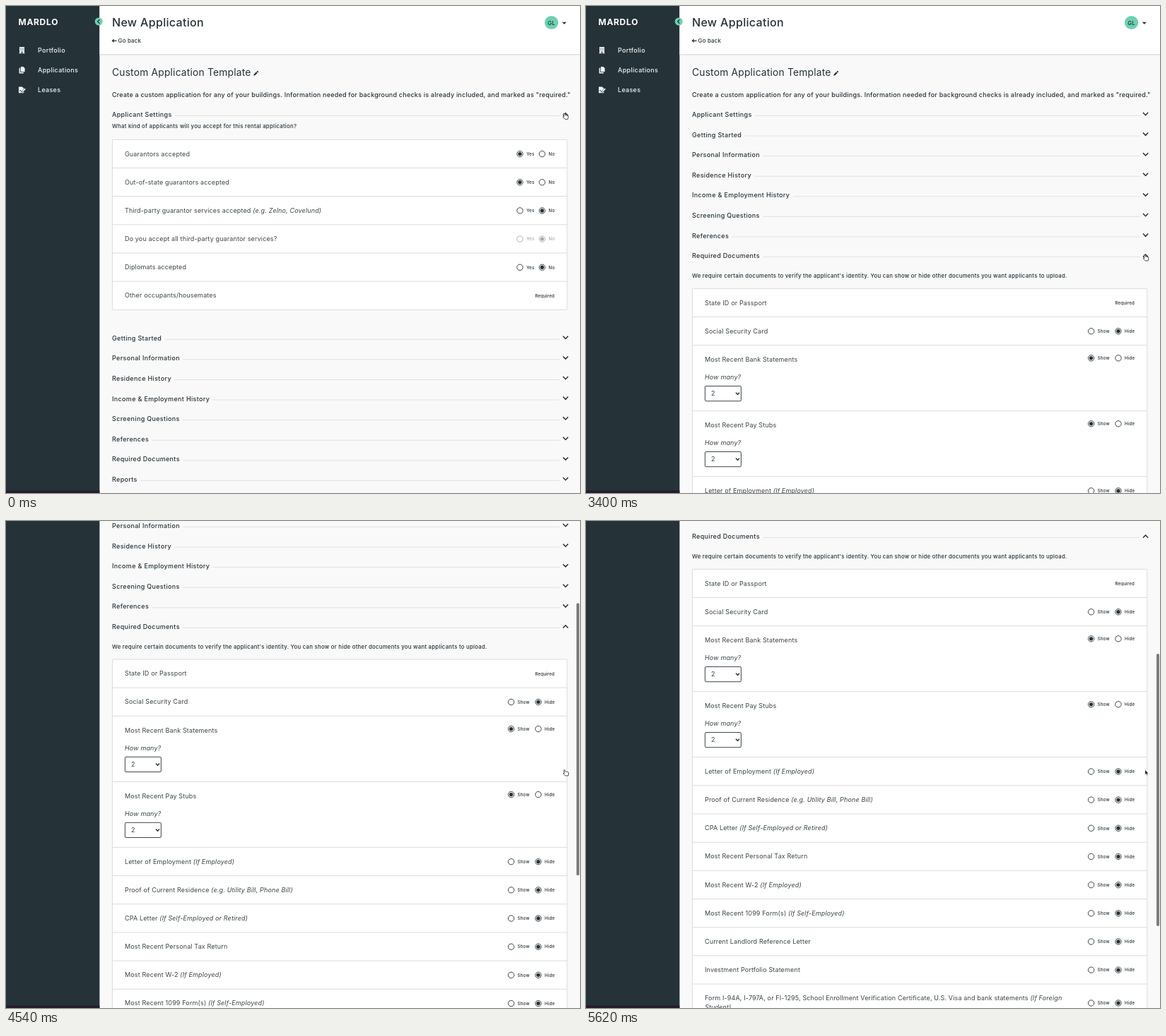
An HTML page for the animation above (5.64 s loop, 812 by 690 pixels).

```html
<!DOCTYPE html>
<html lang="en">
<head>
<meta charset="utf-8">
<title>New Application</title>
<style>
  html, body { margin: 0; width: 100%; height: 100%; overflow: hidden; background: #f9f9f9; }
  svg { display: block; width: 812px; height: 690px; }
  text { font-family: Inter, "Open Sans", sans-serif; fill: #263238; white-space: pre; }
  .h1 { font-size: 16px; font-weight: 450; letter-spacing: .32px; }
  .h2 { font-size: 13.8px; letter-spacing: .2px; }
  .lead { font-size: 9px; font-weight: 450; letter-spacing: .21px; }
  .title { font-size: 9px; font-weight: 450; letter-spacing: .33px; }
  .note { font-size: 7.8px; font-weight: 450; letter-spacing: .25px; }
  .row { font-size: 9px; letter-spacing: .14px; fill: #3a4549; }
  .tiny { font-size: 6.2px; font-weight: 450; letter-spacing: .15px; }
  .nav { font-size: 9px; font-weight: 450; letter-spacing: .3px; fill: #f1f4f4; }
  .brand { font-size: 12px; font-weight: 700; letter-spacing: .7px; fill: #fff; }
  .i { font-style: italic; }
</style>
</head>
<body>
<svg id="stage" viewBox="0 0 812 690" xmlns="http://www.w3.org/2000/svg"></svg>
<script>
const NS = "http://www.w3.org/2000/svg";
const INK = "#263238", LINE = "#dadcdd", GREEN = "#6bd0b1";
const LOOP = 5640, PITCH = 28.6, ROW = 40.17, SIDE = 132.4;
const FONT_SIZE = { h1: 16, h2: 13.8, lead: 9, title: 9, note: 7.8, row: 9, tiny: 6.2, nav: 9, brand: 12 };
const stage = document.getElementById("stage");

function add(parent, tag, attrs = {}) {
  const node = document.createElementNS(NS, tag);
  for (const key in attrs) node.setAttribute(key, attrs[key]);
  return parent.appendChild(node);
}
const rect = (parent, x, y, width, height, fill, more) =>
  add(parent, "rect", { x, y, width, height, fill, ...more });
const path = (parent, d, more) => add(parent, "path", { d, ...more });
const stroke = (color, width) => ({ fill: "none", stroke: color, "stroke-width": width });

// y is the visual middle of the capitals
function text(parent, kind, x, y, content, more) {
  const node = add(parent, "text", { class: kind, x, y: y + FONT_SIZE[kind] * .36, ...more });
  node.textContent = content;
  return node;
}

// A trailing parenthesis is set in italics
function label(parent, x, y, content) {
  const [, main, aside] = content.match(/^(.*?)( \(.*)?$/);
  const node = text(parent, "row", x, y, main);
  if (aside) add(node, "tspan", { class: "i" }).textContent = aside;
}

function radio(parent, x, y, name, on, gap) {
  add(parent, "circle", { cx: x, cy: y, r: 4.2, fill: "#fff", stroke: INK, "stroke-width": .9 });
  if (on) add(parent, "circle", { cx: x, cy: y, r: 2.7, fill: INK });
  text(parent, "tiny", x + gap, y, name);
}

function choice(parent, y, type) {
  if (type === "required" || type === "optional") {
    const name = type[0].toUpperCase() + type.slice(1);
    text(parent, "tiny", 776, y, name, { "text-anchor": "end" });
    return;
  }
  const group = add(parent, "g", type === "locked" ? { opacity: .42 } : {});
  if (["yes", "no", "locked"].includes(type)) {
    radio(group, 727, y, "Yes", type === "yes", 9.2);
    radio(group, 758.4, y, "No", type !== "yes", 9.2);
  } else {
    const shown = type === "show" || type === "count";
    radio(group, 714.6, y, "Show", shown, 9);
    radio(group, 753, y, "Hide", !shown, 9);
  }
}

function select(parent, y) {
  text(parent, "row", 168, y + 45.3, "How many?", { class: "row i" });
  rect(parent, 168.4, y + 57.9, 51, 21.2, "#fff", { rx: 1.5, stroke: INK, "stroke-width": .9 });
  text(parent, "row", 177, y + 68.6, "2");
  path(parent, `M212 ${y + 67.2}l2.5 2.6 2.5-2.6`, stroke(INK, 1.5));
}

function card(parent, top, rows) {
  const heights = { count: 93, double: 53 };
  const height = type => heights[type] || ROW;
  const total = rows.reduce((sum, [, type]) => sum + height(type), 0);
  rect(parent, 150.4, top, 643.4, total, "#fff", { stroke: LINE, rx: 1 });
  let y = top;
  rows.forEach(([name, type], index) => {
    if (index) path(parent, `M150 ${y}H794`, stroke(LINE, 1));
    label(parent, 168, y + 20, name);
    if (type === "count") select(parent, y);
    if (type === "double") text(parent, "row", 168, y + 33, "Student)", { class: "row i" });
    choice(parent, y + (type === "count" ? 18.2 : type === "double" ? 27 : 20.3), type);
    y += height(type);
  });
}

const sections = ["Applicant Settings", "Getting Started", "Personal Information", "Residence History",
  "Income & Employment History", "Screening Questions", "References", "Required Documents", "Reports"];

function heading(parent, y, name, open) {
  const node = text(parent, "title", 150, y, name);
  const end = 154.5 + node.getComputedTextLength();
  path(parent, `M${end} ${y + 1.6}H783.5`, stroke("#dddfe0", .9));
  const d = open ? `M788 ${y + 1.8}l3.6-3.7 3.6 3.7` : `M788 ${y - 2.8}l3.6 3.7 3.6-3.7`;
  path(parent, d, stroke(INK, 1.5));
}

function view(parent, { open, note, noteGap, cardGap, after, rows }) {
  const group = add(parent, "g");
  sections.forEach((name, index) => {
    const y = 153.8 + index * PITCH + (index > open ? after : 0);
    heading(group, y, name, index === open);
    if (index !== open) return;
    text(group, "note", 150, y + noteGap, note);
    card(group, y + cardGap, rows);
  });
  return group;
}

function chrome(parent) {
  rect(parent, SIDE, -2, 812 - SIDE, 70.5, "#fff");
  path(parent, `M${SIDE} 68.8H812`, stroke("#d9dbdc", 1.2));
  text(parent, "h1", 150, 22.8, "New Application");
  path(parent, "M150.5 49.3H156.5M152.6 47.2L150.5 49.3l2.1 2.1", stroke(INK, 1.3));
  text(parent, "note", 158.6, 49.3, "Go back");
  add(parent, "circle", { cx: 771.6, cy: 23.5, r: 9.6, fill: GREEN });
  text(parent, "note", 771.6, 23.7, "GL", { "text-anchor": "middle" });
  path(parent, "M786.8 22.8h6l-3 3.2z", { fill: INK });

  text(parent, "h2", 150, 94, "Custom Application Template");
  path(parent, "M350.2 98.8l.5-2.1 3.4-3.4 1.6 1.6-3.4 3.4zM354.6 92.8l.7-.7q.5-.4 1 0l.6.6q.4.5 0 1l-.7.7z", { fill: INK });
  text(parent, "lead", 150, 125.3, "Create a custom application for any of your buildings. Information needed for background checks is already included, and marked as \"required.\"");
}

function sidebar(parent) {
  text(parent, "brand", 17.5, 22.4, "MARDLO");
  ["Portfolio", "Applications", "Leases"].forEach((name, index) => text(parent, "nav", 45, 62.4 + index * 28.1, name));
  const icon = { fill: "#f1f4f4" };
  path(parent, "M19 58h7v8.5h.6v.8h-8.2v-.8H19z", icon);
  path(parent, "M21 59.6v4M24 59.6v4", { ...stroke("#253338", 1.1), "stroke-dasharray": "1 .7" });
  rect(parent, 21.8, 64.5, 1.5, 2.8, "#253338");
  path(parent, "M21 86h3.4l2.2 2.2v5H21z", icon);
  path(parent, "M18.6 87.8h1.6v6.2h4.6v1.4h-6.2z", icon);
  path(parent, "M18 114.4h5l2 2v1.2l-3.6 3.6v1h3l.9-.9v1.9H18z", icon);
  path(parent, "M22.5 121.9l.3-1.6 3.7-3.7 1.3 1.3-3.7 3.7z", icon);
  path(parent, "M19.4 120.8l1-1.8.9 1.6", stroke("#253338", .8));
  add(parent, "circle", { cx: 131.2, cy: 22, r: 5.5, fill: GREEN });
  path(parent, "M132.4 19.3l-2.7 2.7 2.7 2.7", stroke(INK, 1.3));
}

rect(stage, 0, 0, 812, 690, "#f9f9f9");
rect(stage, 0, 0, SIDE, 690, "#253338");
const page = add(stage, "g");
chrome(page);
sidebar(page);

const views = [
  view(page, {
    open: 0, noteGap: 16.8, cardGap: 35.5, after: 288.2,
    note: "What kind of applicants will you accept for this rental application?",
    rows: [
      ["Guarantors accepted", "yes"],
      ["Out-of-state guarantors accepted", "yes"],
      ["Third-party guarantor services accepted (e.g. Zelno, Covelund)", "no"],
      ["Do you accept all third-party guarantor services?", "locked"],
      ["Diplomats accepted", "no"],
      ["Other occupants/housemates", "required"]
    ]
  }),
  view(page, {
    open: 2, noteGap: 28, cardGap: 46.3, after: 900,
    note: "We require certain questions to verify the applicant's identity. You can add or remove optional questions for your custom application.",
    rows: [
      ["First Name", "required"],
      ["Middle Name", "optional"],
      ["Last Name", "required"],
      ["Date of Birth", "required"],
      ["Phone Number", "required"],
      ["Email Address", "required"],
      ["Social Secuirity Number", "required"],
      ["Driver's License and State of Issuance", "hide"],
      ["Are you a U.S. Citizen? (Y/N)", "hide"],
      ["Do you have a Visa? (Y/N)", "hide"],
      ["Do you have a Green Card? (Y/N)", "hide"]
    ]
  }),
  view(page, {
    open: 7, noteGap: 28, cardGap: 46.3, after: 900,
    note: "We require certain documents to verify the applicant's identity. You can show or hide other documents you want applicants to upload.",
    rows: [
      ["State ID or Passport", "required"],
      ["Social Security Card", "hide"],
      ["Most Recent Bank Statements", "count"],
      ["Most Recent Pay Stubs", "count"],
      ["Letter of Employment (If Employed)", "hide"],
      ["Proof of Current Residence (e.g. Utility Bill, Phone Bill)", "hide"],
      ["CPA Letter (If Self-Employed or Retired)", "hide"],
      ["Most Recent Personal Tax Return", "hide"],
      ["Most Recent W-2 (If Employed)", "hide"],
      ["Most Recent 1099 Form(s) (If Self-Employed)", "hide"],
      ["Current Landlord Reference Letter", "hide"],
      ["Investment Portfolio Statement", "hide"],
      ["Form I-94A, I-797A, or FI-1295, School Enrollment Verification Certificate, U.S. Visa and bank statements (If Foreign", "double"]
    ]
  })
];

rect(stage, 0, 686.5, SIDE, 3.5, "#261b2d");
const thumb = rect(stage, 807, 0, 4, 386, "#7c7c7c", { rx: 2 });
const cursor = add(stage, "g");
const outline = { fill: "#fff", stroke: "#222", "stroke-width": .8, "stroke-linejoin": "round" };
const hand = path(cursor, "M2.2 5.6L1.3 1.5Q1.3.5 2.2.6L3 1 3.6 3.2 4.8 3 5.4 3.4 6.5 3.3 7 3.9 7.8 4 8.2 6 7.5 8.9H3.5L.8 6.2Q.4 5.3 1.2 5.2z", outline);
const arrow = path(cursor, "M3.2.4V7.5L4.8 6.1 5.9 8.5 7 8 6 5.7H8z", { fill: "#111", stroke: "#fff", "stroke-width": .5 });

const scrollKeys = [[3440, 0, 0], [4080, 97.5, .2], [4540, 204, .25], [4840, 281, .2], [5340, 332, 0]];

// Cubic Hermite through [time, offset, speed]
function scrollAt(t) {
  if (t <= scrollKeys[0][0]) return 0;
  for (let i = 1; i < scrollKeys.length; i++) {
    const [t0, p0, v0] = scrollKeys[i - 1], [t1, p1, v1] = scrollKeys[i];
    if (t > t1) continue;
    const d = t1 - t0, u = (t - t0) / d, w = 1 - u;
    return p0 * (1 + 2 * u) * w * w + p1 * u * u * (3 - 2 * u) + d * u * w * (v0 * w - v1 * u);
  }
  return 332;
}

function ease(t, start, end) {
  const u = Math.min(1, Math.max(0, (t - start) / (end - start)));
  return u * u * (3 - 2 * u);
}

function render(t) {
  const current = t < 900 ? 0 : t < 3140 ? 1 : 2;
  views.forEach((group, index) => group.setAttribute("display", index === current ? "inline" : "none"));

  const scroll = scrollAt(t);
  page.setAttribute("transform", `translate(0 ${-scroll})`);
  thumb.setAttribute("y", 1.2 + scroll * .563);
  thumb.setAttribute("display", t >= 3460 ? "inline" : "none");

  const first = ease(t, 740, 900), second = ease(t, 2940, 3120);
  cursor.setAttribute("transform", `translate(${787.2 + first * .8 - second * .3} ${151.5 + first * 57.5 + second * 143})`);
  const released = t >= 5360;
  hand.setAttribute("display", released ? "none" : "inline");
  arrow.setAttribute("display", released ? "inline" : "none");
}

const start = performance.now();
function tick(now) {
  render(Math.max(0, now - start) % LOOP);
  requestAnimationFrame(tick);
}
render(0);
requestAnimationFrame(tick);
</script>
</body>
</html>
```
